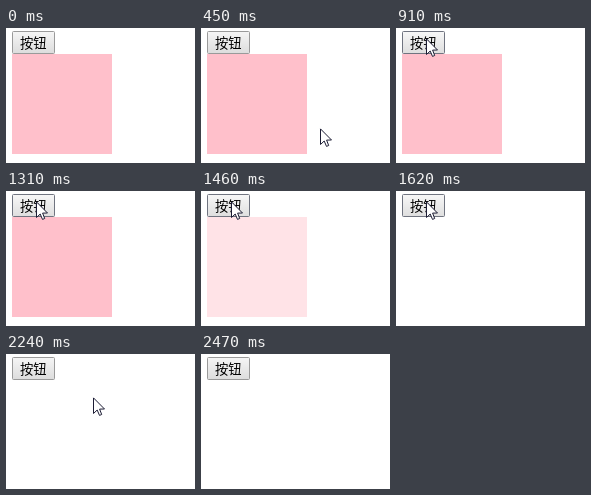
Write an HTML page with a canvas that moves like this. It is 189x135 px and loops after 2870 ms.

```html
<!DOCTYPE html>
<html lang="zh">
<head>
<meta charset="utf-8">
<style>
  html, body { margin: 0; width: 100%; height: 100%; overflow: hidden; background: #fff; }
  canvas { display: block; width: 189px; height: 135px; }
</style>
</head>
<body>
<canvas id="stage"></canvas>
<script>
const W = 189, H = 135, LOOP = 2870;
const button = { x: 6, y: 3, w: 43, h: 23 };
const enter = { x: 119, y: 100 }, rest = { x: 30, y: 10 };
const leave = { x: 62, y: 17 }, exit = { x: 162, y: 121 };

const canvas = document.getElementById('stage');
const ctx = canvas.getContext('2d');
const ratio = window.devicePixelRatio || 1;
canvas.width = W * ratio;
canvas.height = H * ratio;

const looks = {
  normal: { border: '#9a9a9a', top: '#f6f6f6', bottom: '#dcdcdc' },
  hover: { border: '#707480', top: '#f8f8f8', bottom: '#dedede' },
  pressed: { border: '#707480', top: '#dedede', bottom: '#f4f4f4' }
};

// Progress from 0 to 1, held in equal steps like a screen recording.
function stepped(t, from, to, steps) {
  const p = Math.min(1, Math.max(0, (t - from) / (to - from)));
  return Math.floor(p * steps + 0.05) / steps;
}

const easeOut = p => 1 - (1 - p) ** 1.5;

const between = (a, b, p) => ({
  x: Math.round(a.x + (b.x - a.x) * p),
  y: Math.round(a.y + (b.y - a.y) * p)
});

function pointerAt(t) {
  if (t < 450 || t >= 2470) return null;
  if (t < 2100) return between(enter, rest, easeOut(stepped(t, 450, 910, 6)));
  return between(leave, exit, stepped(t, 2100, 2400, 4));
}

const inside = (p, r) =>
  p.x >= r.x && p.x < r.x + r.w && p.y >= r.y && p.y < r.y + r.h;

function drawButton({ border, top, bottom }) {
  const { x, y, w, h } = button;
  const fill = ctx.createLinearGradient(0, y, 0, y + h);
  fill.addColorStop(0, top);
  fill.addColorStop(1, bottom);
  ctx.fillStyle = fill;
  ctx.strokeStyle = border;
  ctx.lineWidth = 1;
  ctx.beginPath();
  ctx.roundRect(x + 0.5, y + 0.5, w - 1, h - 1, 1);
  ctx.fill();
  ctx.stroke();
  ctx.fillStyle = '#000';
  ctx.font = '300 13.333px "Noto Sans CJK SC", "Noto Sans CJK", sans-serif';
  ctx.fillText('按钮', x + 8, y + 17);
}

function drawPointer({ x, y }) {
  ctx.save();
  ctx.translate(x, y);
  ctx.beginPath();
  [[0.5, 0.9], [0.5, 16.5], [4.2, 13], [6.5, 18.4], [8.7, 17.5], [6.6, 12.1], [11.5, 12]]
    .forEach(point => ctx.lineTo(...point));
  ctx.closePath();
  ctx.fillStyle = '#fff';
  ctx.fill();
  ctx.strokeStyle = '#1c1c34';
  ctx.lineWidth = 1;
  ctx.stroke();
  ctx.restore();
}

function draw(t) {
  const pointer = pointerAt(t);
  // The hover look lingers briefly after the pointer leaves.
  const lag = pointerAt(t - 70);
  const over = pointer && (inside(pointer, button) || (lag && inside(lag, button)));
  const down = t >= 1160 && t < 1310;

  ctx.setTransform(ratio, 0, 0, ratio, 0, 0);
  ctx.fillStyle = '#fff';
  ctx.fillRect(0, 0, W, H);

  ctx.globalAlpha = t < 1460 ? 1 : t < 1620 ? 0.45 : 0;
  ctx.fillStyle = '#ffc0cb';
  ctx.fillRect(6, 26, 100, 100);
  ctx.globalAlpha = 1;

  drawButton(down ? looks.pressed : over ? looks.hover : looks.normal);
  if (pointer) drawPointer(pointer);
}

const start = performance.now();
function tick() {
  draw((performance.now() - start) % LOOP);
  requestAnimationFrame(tick);
}
tick();
</script>
</body>
</html>
```
